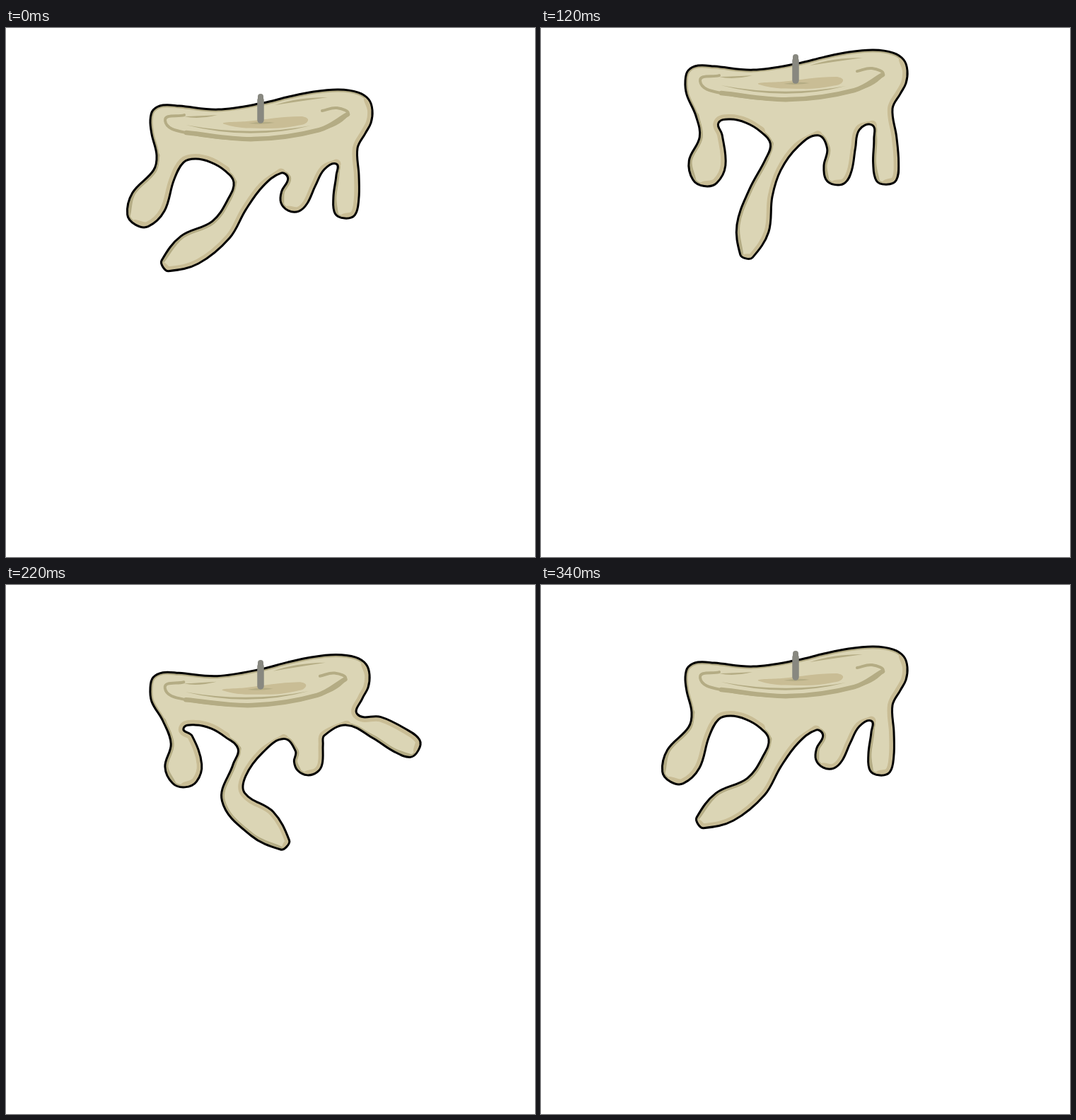
An HTML page with a canvas that plays this animation: 748x748 px, repeating every 0.36 s.

```html
<!DOCTYPE html>
<html lang="en">
<head>
<meta charset="utf-8">
<title>Melting candle</title>
<style>
  html, body { margin: 0; width: 100%; height: 100%; overflow: hidden; background: #fff; }
  canvas { display: block; }
</style>
</head>
<body>
<canvas id="stage" width="748" height="748"></canvas>
<script>
const ctx = document.getElementById('stage').getContext('2d');
const STEP = 20, STEPS = 18, PERIOD = 340;
const WAX = '#dbd5b5', TAN = '#c9bd95', OLIVE = '#b4ac84', WICK = '#888880';

// Each drip hangs from fixed root points, bends at a knee and ends in a swinging tip.
// widths: half widths at the knee, belly and cap; drag: how far the knee follows the tip.
const KEY_TIMES = [0, 80, 140, 220, 260, 300];
const RIGHT = {
  right: [[497, 170]], left: [[467, 192]], knee: [483, 208], drag: 0.4, widths: [16, 18, 14],
  tips: [[479, 269], [488, 275], [496, 273], [583, 221], [518, 267], [484, 269]]
};
const SHORT = {
  right: [[450, 200]], left: [[389, 205]], knee: [418, 218], drag: 0.4, widths: [20, 20, 14],
  tips: [[399, 258], [429, 287], [410, 271], [426, 256], [407, 258], [399, 257]]
};
const LONG = {
  right: [[363, 224], [339, 257]], left: [[315, 240], [322, 218]],
  knee: [304, 285], drag: 0.1, widths: [17, 23, 9],
  tips: [[222, 338], [313, 384], [286, 377], [397, 357], [386, 384], [309, 406]]
};
const LEFT = {
  right: [[251, 190]], left: [[213, 180]], knee: [223, 208], drag: 0.36, widths: [16, 26, 17],
  tips: [[183, 278], [225, 284], [233, 277], [253, 273], [234, 284], [209, 285]]
};

const TOP = [[206, 150], [204, 130], [208, 116], [222, 109], [245, 110], [300, 115], [363, 106],
  [400, 97], [435, 90], [470, 87], [498, 91], [513, 101], [518, 116], [516, 134], [508, 149]];
const ARCH = [[310, 202], [290, 190], [268, 185]];
const RIM = [[252, 123], [225, 131], [255, 148], [350, 157], [443, 144], [483, 122], [468, 113], [447, 117]];
const PUDDLE = [[309, 136], [340, 132], [417, 125], [427, 131], [412, 138], [370, 142]];

const add = (p, q, k = 1) => [p[0] + q[0] * k, p[1] + q[1] * k];
const sub = (p, q) => add(p, q, -1);
const mix = (p, q, u) => add(p, sub(q, p), u);
const unit = ([x, y]) => {
  const len = Math.hypot(x, y) || 1;
  return [x / len, y / len];
};
const normal = ([x, y]) => [y, -x];

const phase = t => 2 * Math.PI * t / PERIOD;
const lift = t => -18.5 - 11.5 * Math.cos(phase(t) - 0.99) + 37.3 * Math.cos(2 * phase(t) - 0.84);
const lean = t => Math.max(0, Math.cos(phase(t - 220))) ** 4;

// Periodic cubic interpolation through the key positions.
function tipAt(keys, t) {
  const n = keys.length;
  const key = i => keys[(i + n) % n];
  const time = i => KEY_TIMES[(i + n) % n] + Math.floor(i / n) * PERIOD;
  let k = n - 1;
  while (KEY_TIMES[k] > t) k--;
  const span = time(k + 1) - time(k), u = (t - time(k)) / span;
  const slope = (i, j) => (key(i + 1)[j] - key(i - 1)[j]) / (time(i + 1) - time(i - 1));
  const base = mix(key(k), key(k + 1), u * u * (3 - 2 * u));
  return base.map((v, j) =>
    v + span * u * (1 - u) * ((1 - u) * slope(k, j) - u * slope(k + 1, j)));
}

// Both sides of a drip, each listed in outline order.
function dripSides({ right, left, knee, drag, widths, tips }, t) {
  const tip = tipAt(tips, t);
  const shift = sub(tip, tips[0]).map(v => v * drag);
  const bend = add(knee, shift);
  const root = mix(right[right.length - 1], left[0], 0.5);
  const along = unit(sub(tip, bend));
  const across = normal(along);
  const kneeAcross = normal(unit(add(along, unit(sub(bend, root)))));
  const [kneeW, bellyW, capW] = widths;
  const belly = mix(bend, tip, 0.54), cap = add(tip, along, -0.4 * capW);
  const side = s => [
    add(bend, kneeAcross, s * kneeW), add(belly, across, s * bellyW), add(cap, across, s * capW)
  ];
  return {
    right: [...right, ...side(1), tip],
    left: [...side(-1).reverse(), ...left.map(p => add(p, shift, 0.35))]
  };
}

// Smooth path whose handles scale with each segment.
function trace(pts, closed) {
  const n = pts.length;
  const at = i => closed ? pts[(i + n) % n] : pts[Math.max(0, Math.min(n - 1, i))];
  const dir = i => unit(sub(at(i + 1), at(i - 1)));
  ctx.beginPath();
  ctx.moveTo(...pts[0]);
  for (let i = 0; i < (closed ? n : n - 1); i++) {
    const p = at(i), q = at(i + 1), h = 0.36 * Math.hypot(...sub(q, p));
    ctx.bezierCurveTo(...add(p, dir(i), h), ...add(q, dir(i + 1), -h), ...q);
  }
  if (closed) ctx.closePath();
}

function fill(pts, color) {
  trace(pts, true);
  ctx.fillStyle = color;
  ctx.fill();
}

function stroke(pts, color, width, closed = false) {
  trace(pts, closed);
  ctx.strokeStyle = color;
  ctx.lineWidth = width;
  ctx.stroke();
}

// Tapered streak from one point to another.
function streak(x1, y1, cx, cy, x2, y2, width) {
  ctx.beginPath();
  ctx.moveTo(x1, y1);
  ctx.quadraticCurveTo(cx, cy - width, x2, y2);
  ctx.quadraticCurveTo(cx, cy + width, x1, y1);
  ctx.fillStyle = OLIVE;
  ctx.fill();
}

function drawSurface() {
  stroke(RIM, OLIVE, 4);
  stroke(RIM.slice(2, 6), OLIVE, 6.5);
  fill(PUDDLE, TAN);
  streak(254, 137, 345, 157, 431, 138, 3);
  streak(252, 125, 272, 127, 299, 123, 2.5);
  streak(380, 109, 412, 101, 455, 98, 3);
  streak(343, 135, 362, 134, 380, 134, 3);
}

function draw(t) {
  const tilt = lean(t), k = tilt * 4 / 315;
  const top = TOP.map(([x, y]) => [x - k * (x - 204), y - k * (x - 204) + 2 * tilt]);
  const [right, short, long, left] = [RIGHT, SHORT, LONG, LEFT].map(d => dripSides(d, t));
  const outline = [top, right.right, right.left, short.right, short.left,
    long.right, long.left, ARCH, left.right, left.left].flat();

  ctx.setTransform(1, 0, 0, 1, 0, 0);
  ctx.fillStyle = '#fff';
  ctx.fillRect(0, 0, 748, 748);
  ctx.translate(0, lift(t));
  ctx.lineCap = ctx.lineJoin = 'round';

  ctx.save();
  fill(outline, WAX);
  ctx.clip();
  stroke(outline, OLIVE, 7, true);
  for (const drip of [right, short, long, left]) stroke(drip.left, OLIVE, 9);
  stroke([...top.slice(-4), ...right.right], TAN, 14);
  stroke([...right.left.slice(-1), ...short.right], TAN, 13);
  stroke([...short.left.slice(-1), ...long.right], TAN, 13);
  stroke([...ARCH, ...left.right], TAN, 14);
  ctx.restore();

  ctx.save();
  ctx.transform(1 - k, -k, 0, 1, 204 * k, 204 * k + 2 * tilt);
  drawSurface();
  ctx.restore();

  stroke(outline, '#000', 3, true);
  stroke([[360, 97], [360, 104]], WICK, 8);
  stroke([[360, 102], [360, 130]], WICK, 9.5);
}

// The pose at the end of the period is held for one extra step.
function tick() {
  const step = Math.floor(performance.now() / STEP) % STEPS;
  draw(step * STEP % PERIOD);
  requestAnimationFrame(tick);
}
tick();
</script>
</body>
</html>
```
